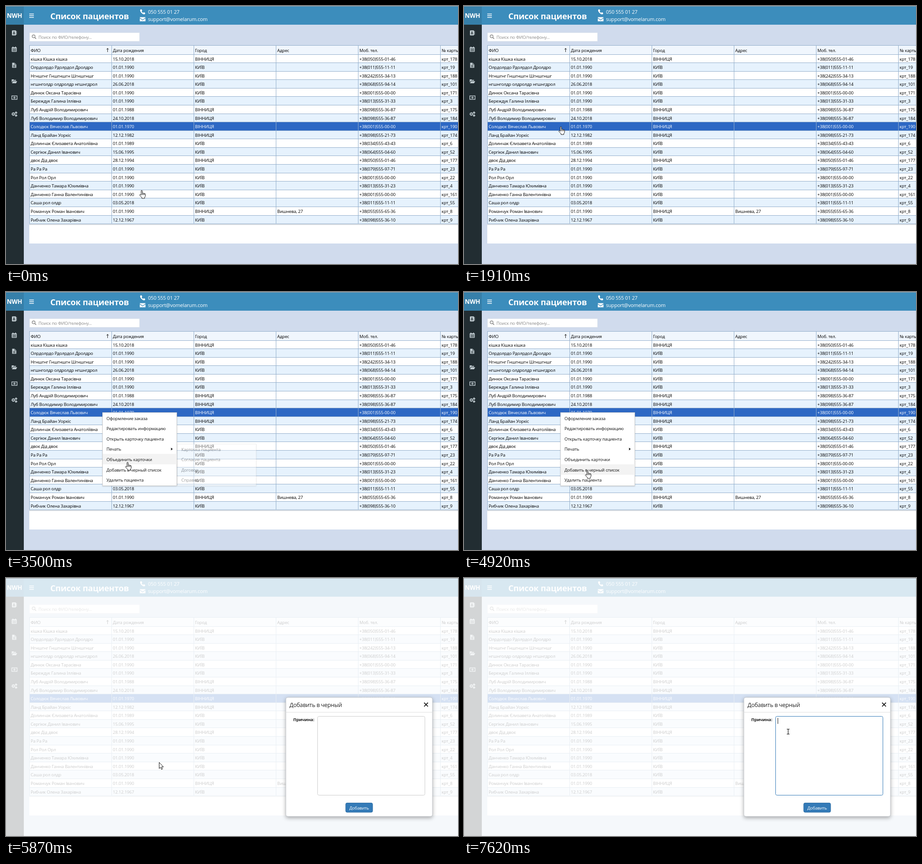
An HTML page for the animation above (8000 ms loop, 990x566 px).

```html
<!DOCTYPE html>
<html lang="ru">
<head>
<meta charset="utf-8">
<style>
html, body { margin: 0; width: 100%; height: 100%; overflow: hidden; background: #d0dbed; }
svg { display: block; width: 990px; height: 566px; }
text { font: 9.5px 'Open Sans', 'Noto Sans', sans-serif; letter-spacing: -.2px; white-space: pre; }
.b { font-weight: 700; }
.panel { fill: #fff; stroke: #d2d2d2; filter: drop-shadow(0 1px 1px rgba(0,0,0,.2)); }
.modal { fill: #fff; stroke: #c4c8cc; filter: drop-shadow(0 3px 4px rgba(0,0,0,.32)); }
</style>
</head>
<body>
<svg id="stage" viewBox="0 0 990 566"></svg>
<script>
const rect = (x, y, w, h, fill, extra = '') =>
  `<rect x="${x}" y="${y}" width="${w}" height="${h}" fill="${fill}" ${extra}/>`;
const text = (x, y, s, fill = '#000', extra = '') =>
  `<text x="${x}" y="${y}" fill="${fill}" ${extra}>${s}</text>`;
const path = (d, fill, extra = '') => `<path d="${d}" fill="${fill}" ${extra}/>`;
const at = (x, y, s) => `<g transform="translate(${x} ${y})">${s}</g>`;

// name | birth date | city (V or K) | address | phone | card
const rows = `кішка Кішка кішка|15.10.2018|V||050)555-01-46|178
Олрдолрдо Рдолрдол Дролдро|01.01.1990|K||011)555-11-11|19
Нгншгнг Гншгншгн Шгншгншг|01.01.1990|K||242)555-34-13|188
нгшнголдр олдролдр нгшнгдрол|26.06.2018|K||068)555-94-14|101
Динюк Оксана Тарасівна|01.01.1990|K||001)555-00-00|171
Береждук Галина Іллівна|01.01.1990|K||013)555-31-33|3
Луб Андрій Володимирович|01.01.1988|V||098)555-36-87|175
Луб Володимир Володимирович|24.10.2018|V||098)555-36-87|184
Солодюк Вячеслав Львович|01.01.1970|V||001)555-00-00|190
Ланд Брайан Уоркіс|12.12.1982|V||098)555-21-73|174
Долинчак Єлизавета Анатоліївна|01.01.1989|K||034)555-43-43|6
Сергіюк Данил Іванович|15.06.1995|K||064)555-04-60|52
двоє Дід двоє|28.12.1994|V||050)555-01-46|177
Ра Ра Ра|01.01.1990|K||079)555-97-71|23
Рол Рол Орл|01.01.1990|K||001)555-00-00|22
Данченко Тамара Юхимівна|01.01.1990|K||013)555-31-23|4
Данченко Ганна Валентинівна|01.01.1990|K||001)555-00-00|161
Саша рол олдр|03.05.2018|K||011)555-11-11|55
Романчук Роман Іванович|01.01.1990|V|Вишнева, 27|055)555-65-36|8
Рибчик Олена Захарівна|12.12.1967|K||098)555-36-10|9`.split('\n').map(r => r.split('|'));
const heads = ['ФИО', 'Дата рождения', 'Город', 'Адрес', 'Моб. тел.', '№ карты'];
const colX = i => 51 + 180 * i, rowY = i => Math.floor(106 + 18.58 * i);

function table() {
  const line = '#93aecb', picked = 8;
  let s = rect(51, 87, 939, 434, '#fff') + rect(51, 87, 939, 19, '#f0f6fd');
  rows.forEach((r, i) => {
    const y = rowY(i), on = i === picked;
    s += rect(51, y, 939, rowY(i + 1) - y, on ? '#2d68c4' : i % 2 ? '#e6f2fd' : '#fff');
    const cells = [r[0], r[1], r[2] === 'V' ? 'ВІННИЦЯ' : 'КИЇВ', r[3], '+38(' + r[4], 'крт_' + r[5]];
    cells.forEach((c, k) => s += text(colX(k) + 3, Math.round(119.5 + 18.58 * i), c, on ? '#fff' : '#000'));
  });
  for (let i = 0; i <= 20; i++) s += rect(51, rowY(i), 939, 1, line);
  s += rect(51, 86, 939, 1, line) + rect(51, 479, 939, 1, '#a9b4c0');
  heads.forEach((h, k) => s += rect(colX(k), 87, 1, 391, line) + text(colX(k) + 3, 100.5, h));
  return s + path('M222.5 101v-8M220.3 95.5l2.2-2.8 2.2 2.8', 'none', 'stroke="#222"');
}

function header() {
  const line = 'stroke="#fff" stroke-width="1.6"';
  return rect(0, 0, 990, 41, '#3c8dbc') + rect(0, 0, 39, 41, '#367fa9') +
    text(18.5, 26, 'NWH', '#fff', 'class="b" text-anchor="middle" style="font-size:13.4px"') +
    path('M51 17.5h10M51 21.2h10M51 25h10', 'none', line) +
    text(97, 28.5, 'Список пациентов', '#fff', 'class="b" style="font-size:18px"') +
    path('M294 8l2.5-1 2 3-1.5 1.5q1 2.5 3.5 3.5l1.5-1.5 3 2-1 2.4q-3 1.5-7-2.4t-3-7.5z', '#fff') +
    path('M293 24.5h12.5v1l-6.25 4.5-6.25-4.5zM293 27l6.25 4.5 6.25-4.5v6.5h-12.5z', '#fff') +
    text(311, 17, '050 555 01 27', '#fff', 'style="font-size:11px"') +
    text(311, 33, 'support@vomelarum.com', '#fff', 'style="font-size:11px"');
}

function sidebar() {
  const c = '#c3ced3', bg = '#222d32';
  const gear = (x, y, r) => `<circle cx="${x}" cy="${y}" r="${r}" fill="none" stroke="${c}" stroke-width="1.7"/>` +
    `<circle cx="${x}" cy="${y}" r="${r + 1.2}" fill="none" stroke="${c}" stroke-dasharray="1.5 1.5"/>`;
  return rect(0, 41, 39, 525, bg) +
    at(18, 59, rect(-5, -5.5, 9, 11, c, 'rx="1"') + rect(4.5, -4, 1, 8, c) +
      `<circle cx="-.5" cy="-1.5" r="1.6" fill="${bg}"/>` + rect(-3, .8, 5, 2, bg, 'rx="1"')) +
    at(18, 95, rect(-5.5, -4.5, 11, 10, c, 'rx="1"') + rect(-3.5, -6, 1.5, 3, c) + rect(2, -6, 1.5, 3, c) +
      path('M-4.5-1.5h9M-4.5 1h9M-4.5 3.3h9M-2-2v6.5M.3-2v6.5M2.6-2v6.5', 'none', `stroke="${bg}" stroke-width=".7"`)) +
    at(18, 130, path('M-4.5-5.5H1L4.5-2V5.5h-9z', c) +
      path('M1-5.5V-2h3.5M-2.5 0h5M-2.5 1.8h5M-2.5 3.6h5', 'none', `stroke="${bg}" stroke-width=".9"`)) +
    at(18, 165, path('M-5.5 3v-7h4l1 1.3h4.5V-1H-3zM-5 4.5l2.5-4.5h9L4 4.5z', c)) +
    at(18.5, 201, rect(-5.8, -3.8, 11.6, 7.6, 'none', `stroke="${c}" stroke-width="1.4"`) +
      `<circle r="2.2" fill="${c}"/>` + rect(-.4, -1.2, .8, 2.4, bg)) +
    at(18, 237, gear(-2, 0, 2.3) + gear(4, -3, 1.1) + gear(4, 3.2, 1.1));
}

const search = rect(51.5, 58.5, 241, 19, '#fff', 'stroke="#dce3ec" rx="1"') +
  '<circle cx="60.5" cy="66.5" r="3.2" fill="none" stroke="#777" stroke-width="1.2"/>' +
  path('M63 69l3 3', 'none', 'stroke="#777" stroke-width="1.5"') +
  text(71, 72, 'Поиск по ФИО/телефону...', '#8a8a8a');

const pitch = 22.6;
const list = (x, y, items) => items.map((s, i) => text(x, Math.round(y + 15.6 + pitch * i), s, '#111')).join('');
const menu = rect(211.5, 264.5, 162.5, 160.5, '#fff', 'class="panel"') +
  rect(212, 265, 162, 23, '#f3f3f3', 'id="hover"') +
  list(220, 265, ['Оформление заказа', 'Редактировать информацию', 'Открыть карточку пациента', 'Печать',
    'Объединить карточки', 'Добавить в черный список', 'Удалить пациента']) +
  path('M361.5 341.5l3.5 3-3.5 3z', '#111');
const submenu = rect(375.5, 333.5, 172.5, 91.5, '#fff', 'class="panel"') +
  list(384, 333, ['Карточка пациента', 'Согласие пациента', 'Договор', 'Справка']);

const dialog = rect(613, 262, 321, 261, '#fff', 'class="modal" rx="4"') +
  text(621, 283, 'Добавить в черный', '#222', 'style="font-size:12.3px"') +
  path('M915.8 273.5l8.4 8.4M924.2 273.5l-8.4 8.4', 'none', 'stroke="#222" stroke-width="1.8"') +
  rect(613, 294, 321, 1, '#dedede') +
  text(629, 313.5, 'Причина:', '#222', 'class="b"') +
  rect(682.5, 303.5, 235, 173, '#fff', 'id="area" rx="3"') +
  rect(687, 307, 1, 13, '#111', 'id="caret"') +
  rect(744, 493.5, 59, 20.5, '#337ab7', 'stroke="#2e6da4" rx="3"') +
  text(773.5, 507.5, 'Добавить', '#fff', 'text-anchor="middle"');

const ink = 'stroke="#111" stroke-linejoin="round"';
const cursors = {
  hand: path('M4 11V2Q4 .6 5.2.6T6.5 2V6.5Q7.7 5.6 8.7 7 10 6.2 11 7.6 13.3 7 13.3 9.3V12Q13 14.5 11.6 16V18H5.5V16.2L1 11.5Q.2 10 1.4 9.5 2.6 9.3 4 11z', '#fff', ink) +
    path('M6.5 7v3.5M8.8 7.5v3M11 8v2.5', 'none', ink),
  arrow: path('M.5.5V14L3.5 11.2 5.7 16 7.8 15 5.7 10.4H9.8z', '#fff', ink),
  beam: path('M-3-5.5H-1Q0-5.5 0-4.5 0-5.5 1-5.5H3M0-4.5V4.5M-3 5.5H-1Q0 5.5 0 4.5 0 5.5 1 5.5H3', 'none', 'stroke="#111" stroke-width="1.2"')
};

stage.innerHTML = rect(0, 0, 990, 566, '#d0dbed') + header() + sidebar() + search + table() +
  `<g id="menuG">${menu}</g><g id="subG">${submenu}</g>` +
  rect(0, 0, 990, 566, '#fff', 'id="veil"') + rect(0, 0, 990, 1, '#a2a4a6') +
  `<g id="dialogG">${dialog}</g>` +
  '<circle id="ring" r="8" fill="none" stroke="#222"/>' +
  Object.keys(cursors).map(k => `<g id="${k}">${cursors[k]}</g>`).join('');

// pointer: start time, x, y
const track = {
  hand: [[0, 292, 404], [130, 276, 364], [280, 257, 317], [430, 243, 296], [560, 231, 278], [710, 222, 273],
    [840, 216, 269], [980, 210, 266], [1110, 207, 264], [2190, 212, 267], [2650, 218, 283], [2800, 226, 300],
    [2930, 235, 323], [3070, 246, 335], [3350, 254, 350], [3500, 261, 373], [3630, 265, 390], [3770, 265, 391]],
  arrow: [[5050, 269, 392], [5590, 277, 394], [5720, 287, 398], [5870, 335, 404], [6000, 405, 409],
    [6150, 505, 401], [6280, 598, 387], [6420, 658, 363]],
  beam: [[6570, 695, 345], [6700, 710, 337]]
};
const steps = Object.entries(track).flatMap(([kind, list]) => list.map(p => [kind, ...p]));
// value of the last [time, value] pair already reached
const held = (t, pairs) => pairs.reduce((v, p) => t >= p[0] ? p[1] : v, 0);
const $ = id => document.getElementById(id);
const set = (id, attrs) => { for (const k in attrs) $(id).setAttribute(k, attrs[k]); };
const show = (id, v) => set(id, { opacity: +v, visibility: v ? 'visible' : 'hidden' });

function draw(now) {
  const t = now % 8000;
  const [kind, , x, y] = steps.reduce((a, s) => t >= s[1] ? s : a);
  for (const k in cursors) show(k, k === kind);
  set(kind, { transform: `translate(${x} ${y})` });

  const click = [[1790, 1910], [4780, 4920], [7470, 7620]].some(([a, b]) => t >= a && t < b);
  show('ring', click);
  set('ring', { cx: kind === 'hand' ? x + 5 : x, cy: kind === 'hand' ? y + 1 : y });

  show('menuG', held(t, [[2060, .5], [2190, 1], [5050, .5], [5200, 0]]));
  show('subG', held(t, [[3200, .6], [3350, 1], [3500, .4], [3630, 0]]));
  const item = Math.max(0, Math.floor((y - 265) / pitch));
  set('hover', { y: Math.round(265 + pitch * Math.min(item, 6)) });

  show('veil', t >= 5050 ? .8 : 0);
  show('dialogG', held(t, [[5050, .1], [5200, .85], [5330, 1]]));
  const k = held(t, [[5050, .56], [5200, .95], [5330, 1]]);
  set('dialogG', { transform: `translate(773.5 392.5) scale(${k}) translate(-773.5 -392.5)` });
  set('area', { stroke: t >= 7620 ? '#337ab7' : t >= 6570 ? '#a8a8a8' : '#ccc' });
  show('caret', t >= 7620);
  requestAnimationFrame(() => draw(performance.now()));
}
draw(0);
</script>
</body>
</html>
```
